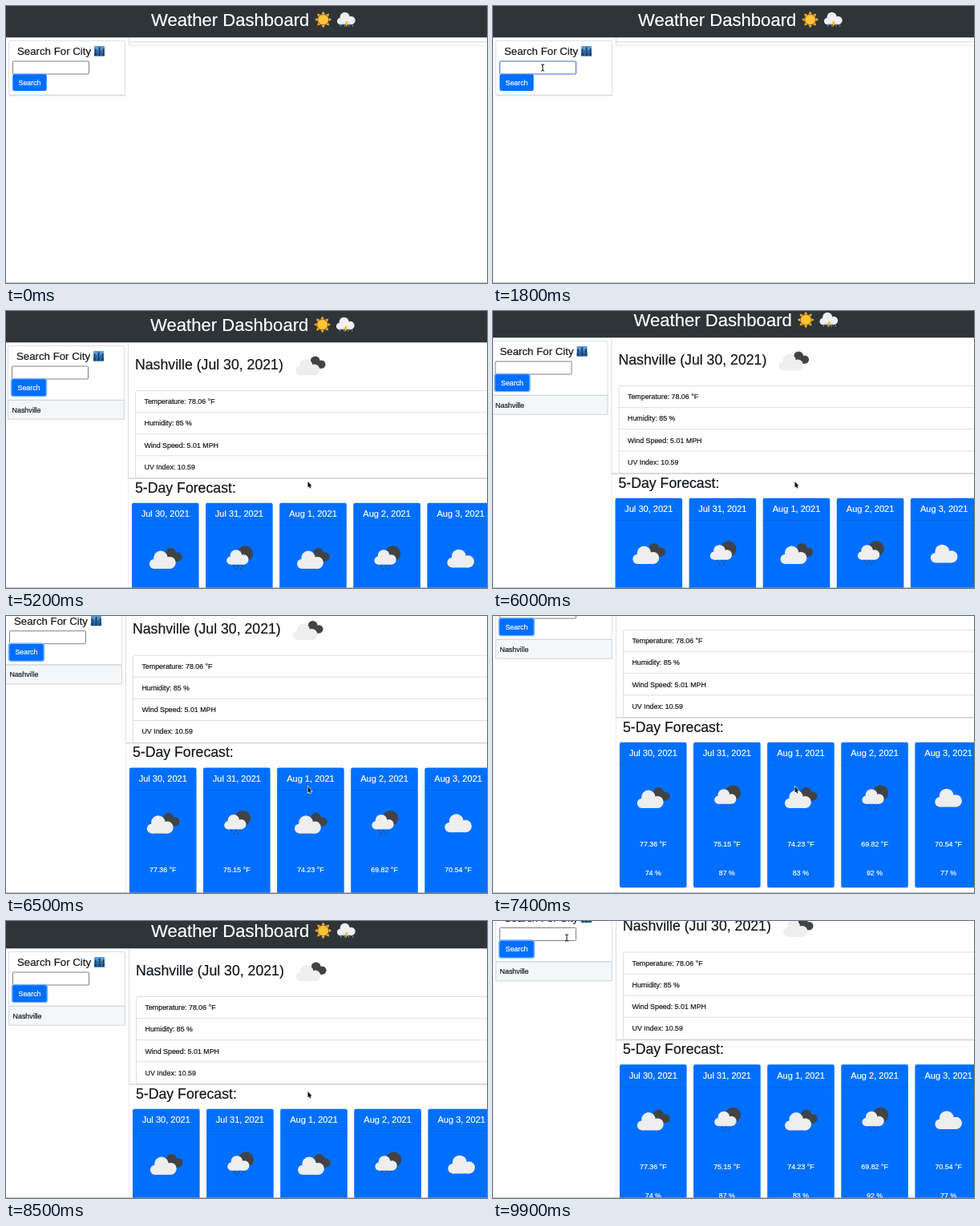
An HTML page with a canvas that plays this animation: 600 px wide and 346 px high, repeating every 10000 ms.

```html
<!DOCTYPE html>
<html lang="en">
<head>
<meta charset="utf-8">
<title>Weather Dashboard</title>
<style>
html, body { margin: 0; width: 100%; height: 100%; overflow: hidden; background: #fefefe; }
canvas { display: block; width: 600px; height: 346px; }
</style>
</head>
<body>
<canvas id="stage" width="600" height="346"></canvas>
<script>
const ctx = document.getElementById('stage').getContext('2d');
const W = 600, H = 346, LOOP = 10000, STEP = 100;
const BLUE = '#006fff', INK = '#14171a', LINE = '#dcdfe2';
const LIGHT = '#eeeeee', DARK = '#424344';
const ROW = 27.1, CARD = 83.6, PITCH = 92.1;

const days = [
  ['Jul 30, 2021', 'broken', '77.36 °F', '74 %'],
  ['Jul 31, 2021', 'rain', '75.15 °F', '87 %'],
  ['Aug 1, 2021', 'broken', '74.23 °F', '83 %'],
  ['Aug 2, 2021', 'rain', '69.82 °F', '92 %'],
  ['Aug 3, 2021', 'cloud', '70.54 °F', '77 %']
];
const stats = ['Temperature: 78.06 °F', 'Humidity: 85 %', 'Wind Speed: 5.01 MPH', 'UV Index: 10.59'];

// Smooth 0..1 between times a and b
function ease(t, a, b) {
  const p = Math.min(1, Math.max(0, (t - a) / (b - a)));
  return p * p * (3 - 2 * p);
}

function scrollAt(t) {
  return {
    x: -5.5 * (ease(t, 4900, 6000) - ease(t, 6000, 7500)),
    y: -6 * ease(t, 5200, 6000) - 76 * ease(t, 6000, 6900)
      + 77 * ease(t, 7500, 8300) - 55.5 * ease(t, 8500, 9400)
  };
}

function pointerAt(t) {
  const toInput = ease(t, 400, 1500), toButton = ease(t, 2500, 3300);
  const toPage = ease(t, 3700, 4800), back = ease(t, 8600, 9500);
  return {
    x: 137 - 75 * toInput - 25 * toButton + 339.5 * toPage - 284.5 * back,
    y: 224 - 147 * toInput + 20 * toButton + 116 * toPage - 192 * back
  };
}

function text(str, x, y, size, color = INK, align = 'left') {
  ctx.font = size + 'px "Liberation Sans", Arial, sans-serif';
  ctx.textAlign = align;
  ctx.fillStyle = ctx.strokeStyle = color;
  ctx.lineWidth = 0.2;
  ctx.fillText(str, x, y);
  ctx.strokeText(str, x, y);
}

function rect(x, y, w, h, color) {
  ctx.fillStyle = color;
  ctx.fillRect(x, y, w, h);
}

function round(x, y, w, h, r, fill, stroke) {
  ctx.beginPath();
  ctx.roundRect(x, y, w, h, r);
  if (fill) { ctx.fillStyle = fill; ctx.fill(); }
  if (stroke) { ctx.strokeStyle = stroke; ctx.lineWidth = 1; ctx.stroke(); }
}

function disc(x, y, r, color) {
  ctx.beginPath();
  ctx.arc(x, y, r, 0, Math.PI * 2);
  ctx.fillStyle = color;
  ctx.fill();
}

function shape(path, fill, stroke) {
  const p = new Path2D(path);
  if (stroke) { ctx.strokeStyle = stroke; ctx.lineWidth = 1.2; ctx.stroke(p); }
  ctx.fillStyle = fill;
  ctx.fill(p);
}

function place(x, y, scale, draw) {
  ctx.save();
  ctx.translate(x, y);
  ctx.scale(scale, scale);
  draw();
  ctx.restore();
}

function cloud(color) {
  disc(-11, 6, 6.5, color);
  disc(-2.5, -2, 9.3, color);
  disc(9.5, 4.5, 8, color);
  rect(-11, 4, 20.5, 8.5, color);
}

const icons = {
  cloud() { place(0, -0.5, 0.96, () => cloud(LIGHT)); },
  broken() {
    place(8.5, -5, 0.7, () => cloud(DARK));
    place(-3.5, 1.2, 0.94, () => cloud(LIGHT));
  },
  rain() {
    disc(7.5, -6, 9.7, DARK);
    place(-2, -2, 0.78, () => cloud(LIGHT));
    for (let i = 0; i < 5; i++) {
      const x = -7 + i * 2.8, y = 10 + (i % 2) * 3.5;
      shape(`M${x - 1} ${y}l1.8 -2v2.6z`, DARK);
    }
  }
};

function sun() {
  for (let i = 0; i < 8; i++) {
    ctx.rotate(Math.PI / 4);
    shape('M-2.2 -7h4.4L0 -10.6z', '#f9a825');
  }
  disc(0, 0, 6.8, '#f9a825');
  disc(0, 0, 5.8, '#fdc437');
}

function storm() {
  place(0, -1, 0.65, () => cloud('#eef1f3'));
  rect(-7, 5.6, 13, 1.2, '#c3cad1');
  for (let x = -7; x < 9; x += 5) rect(x, 7.5, 1, 2, '#6fb4e4');
  shape('M-0.5 3h3L1.5 6H3L-1 10.5L0 7h-1.6z', '#fbc02d');
}

function city() {
  round(0, 0, 13, 12.5, 1, '#5b9bd3');
  rect(0, 8.5, 13, 4, '#1d4f83');
  for (let i = 0; i < 5; i++) {
    const top = 3.5 + 2 * Math.sin(i * 2.4);
    rect(0.6 + i * 2.5, top, 2, 12 - top, i % 2 ? '#2d689f' : '#174272');
  }
}

function header() {
  rect(0, 0, 900, 39.3, '#2e3438');
  text('Weather Dashboard', 181, 25, 22.1, '#fff');
  place(395.7, 17, 1, sun);
  place(424.3, 16, 1, storm);
}

function sidebar(s) {
  rect(4, 111, 145, 1.5, 'rgba(0,0,0,.13)');
  round(3.5, 43.5, 145, 67.5, 1.5, '#fff', LINE);
  text('Search For City', 14, 61, 13.25);
  place(110, 50, 1, city);
  round(8.5, 69, 95, 16, 1, s.filled ? '#e8f0fe' : '#fff', s.focus ? '#3b6fc4' : '#808080');
  text(s.typed, 10.5, 80, 8.85);
  if (s.caret) rect(11 + ctx.measureText(s.typed).width, 72, 0.8, 10, '#111');
  if (s.ring) round(6.7, 83.7, 45.6, 23.6, 3.5, '#7fb6ff');
  round(8.3, 85.3, 42.4, 20.7, 2.2, s.hover ? '#0059d0' : BLUE);
  text('Search', 29.5, 98.7, 8.85, '#fff', 'center');
  if (s.results) {
    round(3.5, 111.5, 145, 23.7, 0, '#f4f6f8', '#d3d7db');
    text('Nashville', 8.6, 126.6, 8.85);
  }
}

function emptyPanel() {
  rect(153, 40, 1, 10, LINE);
  rect(153, 44.3, 447, 1, '#d6dae3');
  rect(153, 49.2, 447, 0.8, '#dfe3e8');
}

function current() {
  rect(153, 40, 1, 169, LINE);
  rect(153, 209, 1, 300, '#eceef0');
  text('Nashville (Jul 30, 2021)', 162, 72.5, 17.7);
  place(380.5, 68.3, 0.92, icons.broken);
  round(162.5, 99.5, 600, 109, 2, '#fff', LINE);
  stats.forEach((line, i) => {
    if (i) rect(162, 99 + i * ROW, 500, 1, LINE);
    text(line, 173.5, 116.3 + i * ROW, 8.85);
  });
  rect(153, 208.4, 500, 1.3, '#cfd3d7');
  text('5-Day Forecast:', 162, 226.6, 17.7);
}

function forecast() {
  days.forEach(([date, icon, temp, hum], i) => {
    const x = 158 + i * PITCH, mid = x + CARD / 2;
    round(x, 239.8, CARD, 181.4, 2.2, BLUE);
    rect(x, 267.3, CARD, 0.8, 'rgba(0,0,0,.13)');
    text(date, mid, 257.2, 11.05, '#fff', 'center');
    place(mid, 309, 1, icons[icon]);
    text(temp, mid, 370.3, 8.85, '#fff', 'center');
    text(hum, mid, 406, 8.85, '#fff', 'center');
  });
}

function arrow() {
  shape('M0 0V7.6L1.6 6.2L2.8 8.6L4 8L2.9 5.6H5z', '#111', '#fff');
}

function hand() {
  shape('M-1 0H0.5V3.5L4 4.5V8L2.8 10H-1.5L-3.8 6L-1 6.5z', '#fff', '#111');
}

function beam() {
  ctx.strokeStyle = '#111';
  ctx.lineWidth = 1;
  ctx.stroke(new Path2D('M-2 -4.2Q0 -4.2 0 -2.8Q0 -4.2 2 -4.2M0 -3V3M-2 4.2Q0 4.2 0 2.8Q0 4.2 2 4.2'));
}

function render(t) {
  const scroll = scrollAt(t), pointer = pointerAt(t);
  const shown = t >= 400, results = t >= 3800, filled = t >= 2800 && !results;
  const over = (x, y, w, h) => {
    const dx = pointer.x - scroll.x - x, dy = pointer.y - scroll.y - y;
    return shown && dx >= 0 && dx <= w && dy >= 0 && dy <= h;
  };
  const hover = over(8, 85, 43, 21);
  const typing = 'Nash'.slice(0, Math.max(0, Math.floor((t - 1700) / 150)));

  rect(0, 0, W, H, '#fefefe');
  ctx.save();
  ctx.translate(scroll.x, scroll.y);
  header();
  if (results) { current(); forecast(); } else emptyPanel();
  sidebar({
    results, filled, hover,
    ring: t >= 3600,
    focus: t >= 1500 && t < 3300,
    caret: t >= 1500 && t < 2800 && t % 1000 < 500,
    typed: results ? '' : filled ? 'Nashville' : typing
  });
  ctx.restore();
  rect(0, 345, W, 1, 'rgba(150,150,155,.55)');
  if (shown) place(pointer.x, pointer.y, 1, hover ? hand : over(8, 68, 96, 17) ? beam : arrow);
}

const start = performance.now();
function tick() {
  const t = (performance.now() - start) % LOOP;
  render(Math.floor(t / STEP) * STEP);
  requestAnimationFrame(tick);
}
tick();
</script>
</body>
</html>
```
